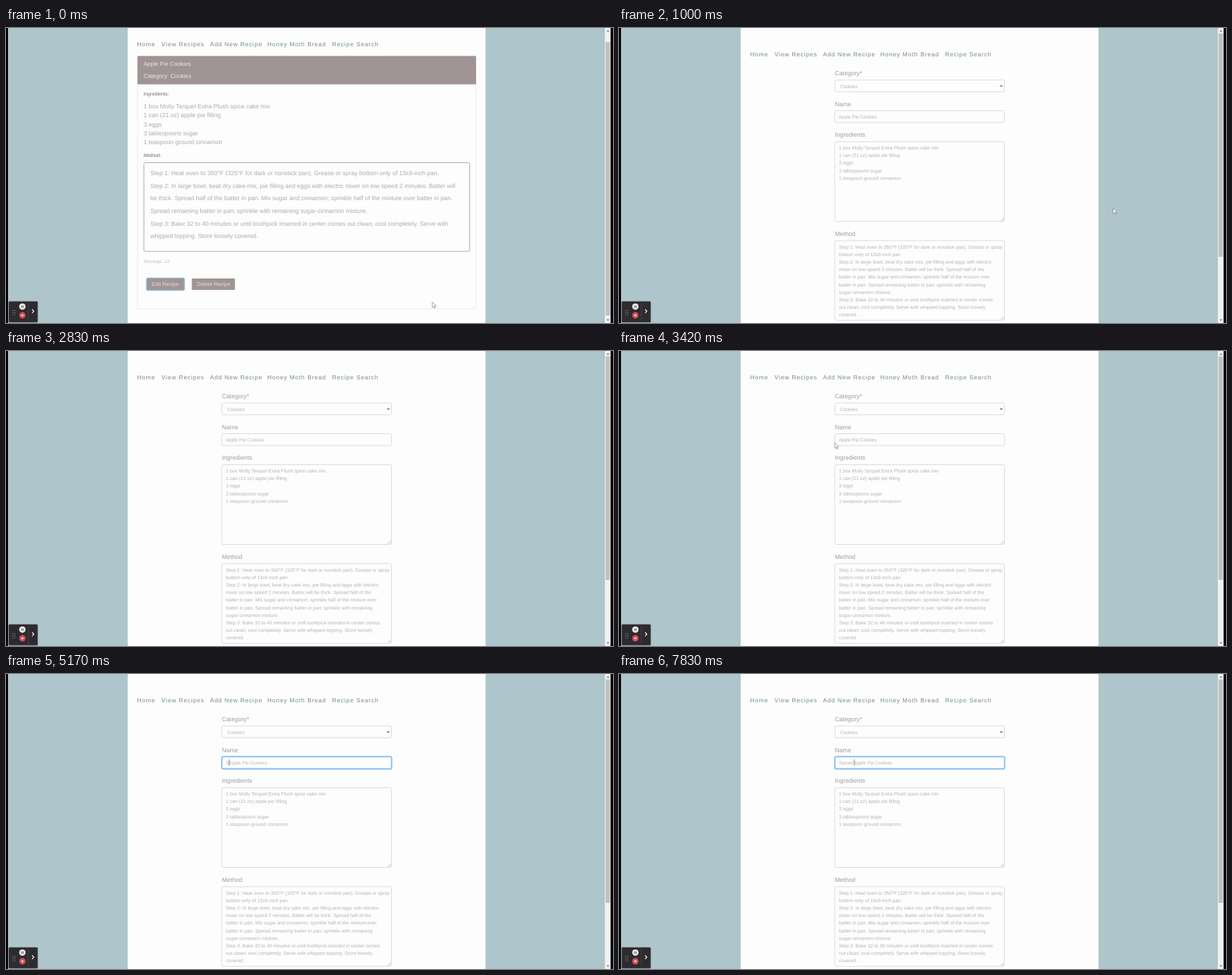
These frames come from a looping animation (900x437 px, 8000 ms). An HTML page:

```html
<!DOCTYPE html>
<html lang="en">
<head>
<meta charset="utf-8">
<title>Recipe editor</title>
<style>
  html, body { margin: 0; width: 100%; height: 100%; overflow: hidden; background: #aec6cb; }
  svg { display: block; width: 100%; height: 100%; }
  text { font-family: "Liberation Sans", Arial, sans-serif; text-rendering: geometricPrecision; white-space: pre; }
  .nav { font-size: 8.8px; letter-spacing: .87px; fill: #728a94; }
  .body { font-size: 9px; fill: #ababab; }
  .head { font-size: 8.6px; fill: #ebe7e7; }
  .strong { font-size: 7.2px; fill: #6c6c6c; }
  .small { font-size: 6.9px; fill: #bcbcbc; }
  .button { font-size: 7.9px; fill: #e4dfdf; }
  .label { font-size: 9.1px; fill: #9d9d9d; }
  .field { font-size: 7.12px; fill: #b4b4b4; }
  .name { font-size: 6.9px; fill: #b4b4b4; }
  .box { fill: none; stroke: #dadada; }
</style>
</head>
<body>
<svg viewBox="0 0 900 437" preserveAspectRatio="none">
  <rect width="900" height="437" fill="#aec6cb"/>
  <rect x="180.5" width="530.5" height="437" fill="#fdfdfd"/>
  <g id="nav"></g>

  <g id="detail">
    <rect class="box" x="195" y="41.5" width="501.5" height="374.5" rx="2" style="stroke:#e9e9e9"/>
    <rect x="195" y="41.5" width="502" height="42" rx="1" fill="#a09594"/>
    <rect class="box" x="204.5" y="199.5" width="483" height="131.5" rx="2" style="stroke:#aaa"/>
    <rect x="208.5" y="370.5" width="56" height="18" rx="2" fill="#a09594" stroke="#8fbad6" stroke-width="1.6"/>
    <rect x="275.5" y="371" width="64" height="17" rx="1.5" fill="#a09594"/>
  </g>

  <g id="form">
    <rect class="box" x="320" y="77" width="251.5" height="17.5" rx="2"/>
    <path d="M565 84.8l1.8 1.8 1.8-1.8" fill="none" stroke="#666" stroke-width="1.2"/>
    <rect class="box" x="320" y="122.5" width="251.5" height="17.5" rx="2"/>
    <rect id="focus" x="320" y="122.3" width="251.8" height="18.4" rx="2.5" fill="none" stroke="#93c4f4" stroke-width="2.2"/>
    <rect class="box" x="320" y="168.5" width="251.5" height="118" rx="2"/>
    <rect class="box" x="320" y="315" width="251.5" height="118" rx="2"/>
    <path d="M566 285.5l4.5-4.5m-2 4.5l2-2M566 432l4.5-4.5m-2 4.5l2-2" stroke="#aaa" stroke-width=".7"/>
    <text id="name" class="name" x="326" y="134"></text>
    <path id="caret" d="M0 126.5v9.5" stroke="#777" stroke-width=".9"/>
  </g>

  <rect x="888" width="8.5" height="437" fill="#f1f1f1"/>
  <rect id="thumb" x="889" width="6.5" fill="#c1c1c1"/>
  <path d="M890.5 5.5h4l-2-2.4zM890.5 431.5h4l-2 2.4z" fill="#777"/>
  <path d="M0 0h3v437H0zM896.5 0h3.5v437h-3.5z"/>

  <g id="recorder">
    <rect x="4" y="405" width="43" height="31" rx="1.5" fill="#2d2b2d" stroke="#5d656a" stroke-opacity=".7"/>
    <path d="M10 418v8M13 418v8" stroke="#999" stroke-width="1.2" stroke-dasharray="1.2 2"/>
    <path d="M33 408v25" stroke="#444245"/>
    <circle cx="24.3" cy="412.7" r="4.8" fill="#e9e9e9"/>
    <path d="M23.2 411v3.6M25.4 411v3.6" stroke="#555"/>
    <circle cx="24.3" cy="425.6" r="4.8" fill="#d24c58"/>
    <rect x="22.8" y="424.1" width="3" height="3" fill="#f0c4c8"/>
    <path d="M38.7 416.8l2.5 2.8-2.5 2.8" fill="none" stroke="#eee" stroke-width="1.4"/>
  </g>
  <path id="cursor" d="M0 0V8L1.9 6.3 3.2 9.2 4.5 8.6 3.2 5.8H5.8Z" fill="#fff" stroke="#777" stroke-width=".7"/>
</svg>

<script>
const $ = id => document.getElementById(id);
const LOOP = 8000, STEP = 1000 / 12, FORM_OPENS = 1000, FOCUSED = 3500;

const ingredients = [
  '1 box Molly Tarquel Extra Plush spice cake mix', '1 can (21 oz) apple pie filling',
  '3 eggs', '3 tablespoons sugar', '1 teaspoon ground cinnamon'];
const wideMethod = [
  'Step 1: Heat oven to 350°F (325°F for dark or nonstick pan). Grease or spray bottom only of 13x9-inch pan.',
  'Step 2: In large bowl, beat dry cake mix, pie filling and eggs with electric mixer on low speed 2 minutes. Batter will',
  'be thick. Spread half of the batter in pan. Mix sugar and cinnamon; sprinkle half of the mixture over batter in pan.',
  'Spread remaining batter in pan; sprinkle with remaining sugar-cinnamon mixture.',
  'Step 3: Bake 32 to 40 minutes or until toothpick inserted in center comes out clean; cool completely. Serve with',
  'whipped topping. Store loosely covered.'];
const narrowMethod = [
  'Step 1: Heat oven to 350°F (325°F for dark or nonstick pan). Grease or spray',
  'bottom only of 13x9-inch pan.',
  'Step 2: In large bowl, beat dry cake mix, pie filling and eggs with electric',
  'mixer on low speed 2 minutes. Batter will be thick. Spread half of the',
  'batter in pan. Mix sugar and cinnamon; sprinkle half of the mixture over',
  'batter in pan. Spread remaining batter in pan; sprinkle with remaining',
  'sugar-cinnamon mixture.',
  'Step 3: Bake 32 to 40 minutes or until toothpick inserted in center comes',
  'out clean; cool completely. Serve with whipped topping. Store loosely',
  'covered.'];

function write(group, style, x, y, lines, leading = 0) {
  [].concat(lines).forEach((line, i) => $(group).insertAdjacentHTML('beforeend',
    `<text class="${style}" x="${x}" y="${y + i * leading}">${line}</text>`));
}

write('nav', 'nav', 194.5, 27, 'Home');
write('nav', 'nav', 230.5, 27, 'View Recipes');
write('nav', 'nav', 302.5, 27, 'Add New Recipe');
write('nav', 'nav', 387.5, 27, 'Honey Moth Bread');
write('nav', 'nav', 483.5, 27, 'Recipe Search');

write('detail', 'head', 204, 56, ['Apple Pie Cookies', 'Category: Cookies'], 18);
write('detail', 'strong', 204, 100, 'Ingredients:');
write('detail', 'body', 204, 118.6, ingredients, 13.45);
write('detail', 'strong', 204, 190.5, 'Method:');
write('detail', 'body', 214, 218, wideMethod, 18.65);
write('detail', 'small', 204, 348, 'Servings: 12');
write('detail', 'button', 216, 382.3, 'Edit Recipe');
write('detail', 'button', 283, 382.3, 'Delete Recipe');

write('form', 'label', 320, 70, 'Category*');
write('form', 'label', 320, 115.5, 'Name');
write('form', 'label', 320, 161, 'Ingredients');
write('form', 'label', 320, 307.5, 'Method');
write('form', 'field', 328, 88.5, 'Cookies');
write('form', 'field', 326, 180, ingredients, 11.2);
write('form', 'field', 326, 326.5, narrowMethod, 11.2);

const typed = 'Spiced ';
const keyTimes = [5170, 5420, 5670, 6000, 6420, 6670, 6750];
const caretOff = [[3920, 4170], [4750, 5170], [7250, 7830]];

// Pointer paths: [time, x, y]; the pointer is hidden between paths.
const paths = [
  [[0, 632, 406], [330, 576, 394], [830, 683, 343], [920, 746, 293], [1000, 732.5, 267],
   [1250, 362, 75], [1670, 362, 75], [2420, 348, 147], [2500, 348, 147]],
  [[3330, 313, 141], [3500, 326, 132], [3670, 343, 131], [3920, 343, 131]]];

function pointerAt(t) {
  const path = paths.find(p => t >= p[0][0] && t < p.at(-1)[0]);
  if (!path) return null;
  const i = path.findIndex(p => p[0] > t), [t0, x0, y0] = path[i - 1], [t1, x1, y1] = path[i];
  const k = (t - t0) / (t1 - t0);
  return [x0 + (x1 - x0) * k, y0 + (y1 - y0) * k];
}

const show = (id, on) => $(id).setAttribute('visibility', on ? 'visible' : 'hidden');

function draw(now) {
  const t = Math.round(Math.floor((now % LOOP + 5) / STEP) * STEP / 10) * 10;
  const editing = t >= FORM_OPENS, focused = t >= FOCUSED;
  show('detail', !editing);
  show('form', editing);
  show('focus', focused);
  $('nav').setAttribute('transform', `translate(0 ${editing ? 15 : 0})`);
  $('thumb').setAttribute('y', editing ? 8 : 21);
  $('thumb').setAttribute('height', editing ? 331 : 405);

  const count = keyTimes.filter(k => t >= k).length;
  $('name').textContent = typed.slice(0, count) + 'Apple Pie Cookies';
  show('caret', focused && !caretOff.some(([from, to]) => t >= from && t < to));
  $('caret').setAttribute('transform', `translate(${$('name').getStartPositionOfChar(count).x + .3} 0)`);

  const pointer = pointerAt(t);
  show('cursor', pointer);
  if (pointer) $('cursor').setAttribute('transform', `translate(${pointer})`);
}

function tick() {
  draw(performance.now());
  requestAnimationFrame(tick);
}
tick();
</script>
</body>
</html>
```
